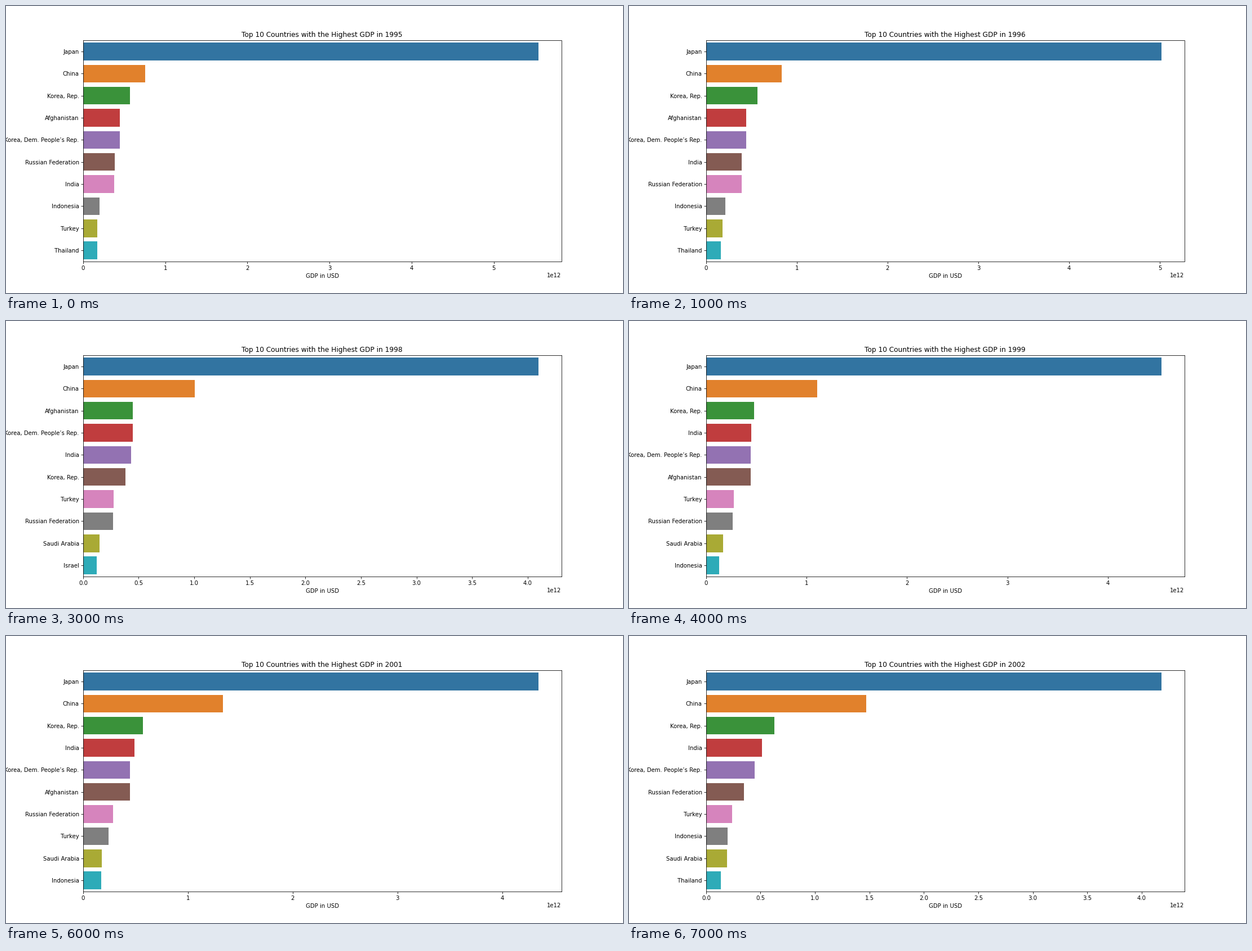
Animation of 1095x511 px, one loop 8 s. Source, as a matplotlib script:

```python
import colorsys

import matplotlib.pyplot as plt
import numpy as np
from matplotlib.animation import FuncAnimation

plt.rcParams["font.family"] = "DejaVu Sans"

FIRST_YEAR, LAST_YEAR = 1995, 2002
TOP = 10

# GDP in trillions of USD: first and last value, with constant growth between
STEADY = {
    "China": (0.755, 1.470),
    "Afghanistan": (0.4446, 0.4444),
    "Korea, Dem. People’s Rep.": (0.4445, 0.4445),
    "India": (0.375, 0.515),
    "Israel": (0.121, 0.121),
}
LAST_REPORT = {"Afghanistan": 2001}

# Turning points of the economies hit by the 1998 crisis and the 2001 slump
TURNS = (1995, 1997, 1998, 2000, 2002)
VOLATILE = {
    "Japan": (5.546, 4.492, 4.098, 4.968, 4.183),
    "Korea, Rep.": (0.567, 0.570, 0.383, 0.577, 0.627),
    "Russian Federation": (0.388, 0.394, 0.271, 0.260, 0.346),
    "Indonesia": (0.202, 0.216, 0.095, 0.165, 0.196),
    "Turkey": (0.170, 0.190, 0.276, 0.274, 0.240),
    "Thailand": (0.169, 0.150, 0.114, 0.126, 0.134),
    "Saudi Arabia": (0.143, 0.165, 0.147, 0.190, 0.190),
}
SLUMP_YEAR, SLUMP = 2001, 0.95


def muted(rgb, saturation=0.75):
    h, l, s = colorsys.rgb_to_hls(*rgb)
    return colorsys.hls_to_rgb(h, l, s * saturation)


COLORS = [muted(rgb) for rgb in plt.get_cmap("tab10").colors]


def gdp_in(year):
    progress = (year - FIRST_YEAR) / (LAST_YEAR - FIRST_YEAR)
    slump = SLUMP if year == SLUMP_YEAR else 1
    gdp = {name: start * (end / start) ** progress
           for name, (start, end) in STEADY.items()
           if year <= LAST_REPORT.get(name, LAST_YEAR)}
    for name, values in VOLATILE.items():
        gdp[name] = np.interp(year, TURNS, values) * slump
    return gdp


fig, ax = plt.subplots(figsize=(15, 7), dpi=73)


def draw(index):
    year = FIRST_YEAR + index
    gdp = gdp_in(year)
    names = sorted(gdp, key=gdp.get, reverse=True)[:TOP]
    values = [gdp[name] * 1e12 for name in names]

    ax.clear()
    ax.barh(range(TOP), values, height=0.8, color=COLORS, linewidth=0)
    ax.set_yticks(range(TOP), names)
    ax.set_ylim(TOP - 0.5, -0.5)
    ax.set_xlim(0, values[0] * 1.05)
    ax.set_xlabel("GDP in USD")
    ax.set_title(f"Top {TOP} Countries with the Highest GDP in {year}")
    return []


anim = FuncAnimation(fig, draw, frames=LAST_YEAR - FIRST_YEAR + 1,
                     init_func=lambda: draw(0), interval=1000,
                     repeat=True, repeat_delay=0)
plt.show()
```
